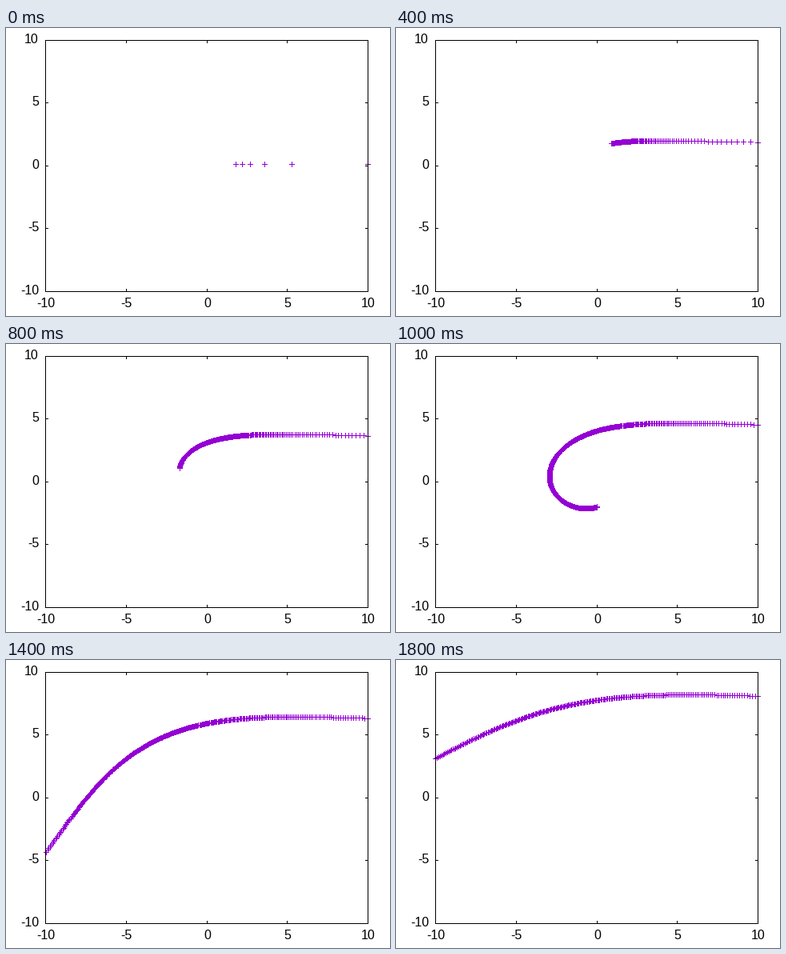
A matplotlib script for the animation above (1.9 s loop, 480 px wide and 360 px high).

```python
import numpy as np
import matplotlib.pyplot as plt
from matplotlib.animation import FuncAnimation

W, H, DPI = 480, 360, 100
PX = 72 / DPI                                # one pixel in points
LEFT, RIGHT, TOP, BOTTOM = 49, 452, 15, 329  # plot border in pixels
LIM = 10
FRAMES, INTERVAL = 19, 100
STEPS = 628                                  # steps from the start angle to a full turn
ARM = 3                                      # half length of a cross
TICK = 3

plt.rcParams["font.family"] = "Liberation Sans"
plt.rcParams["path.simplify"] = False


def to_px(x, y):
    """Data coordinates to whole pixels."""
    px = LEFT + np.floor((x + LIM) * (RIGHT - LEFT) / (2 * LIM) + 0.5)
    py = BOTTOM - np.floor((y + LIM) * (BOTTOM - TOP) / (2 * LIM) + 0.5)
    return px, py


def slope(s):
    """Orbit equation u'' = 3u^2 - u for light, with u = 1/r and mass 1."""
    u, du = s
    return np.array([du, 3 * u * u - u])


def rk4(s, h):
    a = slope(s)
    b = slope(s + a * h / 2)
    c = slope(s + b * h / 2)
    d = slope(s + c * h)
    return s + (a + 2 * b + 2 * c + d) * h / 6


def light_ray(y0):
    """Light path around a black hole, sent left from (LIM, y0)."""
    r, phi0 = np.hypot(LIM, y0), np.arctan2(y0, LIM)
    h = (2 * np.pi - phi0) / STEPS
    s = np.array([1 / r, np.sqrt(1 - 2 / r) * LIM / (r * y0)])
    us = [s[0]]
    while 1 / 30 < s[0] < 0.5 and len(us) <= STEPS:
        s = rk4(s, h)
        us.append(s[0])
    phi = phi0 + h * np.arange(len(us))
    return np.cos(phi) / us, np.sin(phi) / us


def crosses(x, y):
    """Polyline with gaps that draws a plus sign at every visible point."""
    seen = (np.abs(x) <= LIM + 1e-6) & (np.abs(y) <= LIM + 1e-6)
    cx, cy = to_px(x[seen], y[seen])
    cx, cy = cx + 0.5, cy + 0.5
    a, gap = ARM + 0.5, np.full(cx.shape, np.nan)
    xs = np.column_stack([cx - a, cx + a, gap, cx, cx, gap])
    ys = np.column_stack([cy, cy, gap, cy - a, cy + a, gap])
    return xs.ravel(), ys.ravel()


fig = plt.figure(figsize=(W / DPI, H / DPI), dpi=DPI, facecolor="white")
ax = fig.add_axes([0, 0, 1, 1])
ax.set_xlim(0, W)
ax.set_ylim(H, 0)
ax.axis("off")


def stroke(xs, ys, color="black", cap="butt", z=3):
    line, = ax.plot(xs, ys, color=color, lw=PX, solid_capstyle=cap,
                    solid_joinstyle="miter", zorder=z)
    line.set_snap(False)
    return line


def bar(x0, y0, x1, y1):
    """Line covering both end pixels."""
    stroke([x0 + 0.5, x1 + 0.5], [y0 + 0.5, y1 + 0.5], cap="projecting")


bar(LEFT, TOP, RIGHT, TOP)
bar(LEFT, BOTTOM, RIGHT, BOTTOM)
bar(LEFT, TOP, LEFT, BOTTOM)
bar(RIGHT, TOP, RIGHT, BOTTOM)

for v in range(-LIM, LIM + 1, 5):
    px, py = to_px(v, v)
    bar(px, TOP, px, TOP + TICK)
    bar(px, BOTTOM - TICK, px, BOTTOM)
    bar(LEFT, py, LEFT + TICK, py)
    bar(RIGHT - TICK, py, RIGHT, py)
    ax.text(px + 0.5, 349, str(v), fontsize=16 * PX, ha="center", va="baseline")
    ax.text(41, py + 4, str(v), fontsize=16 * PX, ha="right", va="baseline")

trail = stroke([], [], color="#9400d3", z=2)


def draw(i):
    trail.set_data(*crosses(*light_ray(0.1 + 8 * i / (FRAMES - 1))))
    return trail,


anim = FuncAnimation(fig, draw, frames=FRAMES, interval=INTERVAL,
                     repeat=True, repeat_delay=0)
plt.show()
```
